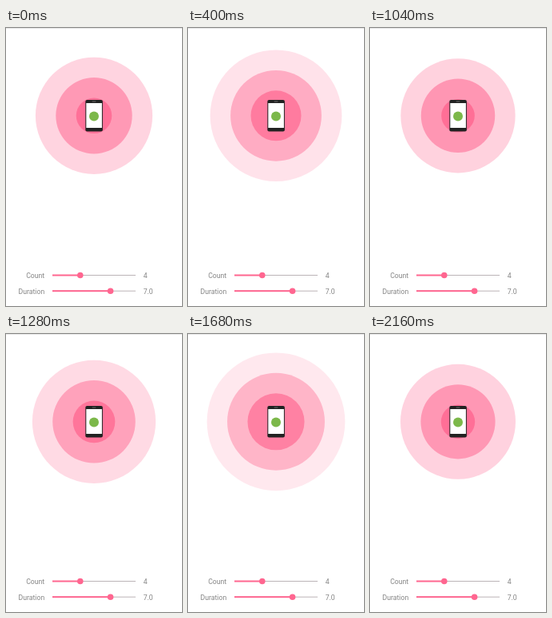
Write an HTML page that moves like this. It is 220 by 348 pixels and loops after 2240 ms.

```html
<!DOCTYPE html>
<html lang="en">
<head>
<meta charset="utf-8">
<title>Pulse rings</title>
<style>
  html, body { margin: 0; width: 100%; height: 100%; overflow: hidden; background: #fff; }
  svg { display: block; }
  text { font: 8.7px Roboto, sans-serif; fill: #858585; }
  .label { text-anchor: end; }
  .pink { fill: #ff6690; }
</style>
</head>
<body>
<svg width="220" height="348" viewBox="0 0 220 348">
  <rect width="220" height="1" fill="#e9e9e9"/>
  <g id="rings" class="pink"></g>

  <rect x="99.3" y="90" width="21.6" height="39.5" rx="2" fill="#222"/>
  <rect x="100.3" y="94" width="19.6" height="31" fill="#fff"/>
  <rect x="107.5" y="91.6" width="5" height="0.9" rx="0.4" fill="#666"/>
  <circle cx="110" cy="110.5" r="6" fill="#7cb84a"/>

  <g id="sliders"></g>
</svg>
<script>
const FRAME = 80, LOOP = 2240;
const GAP = 25.4, REACH = 4 * GAP;   // four rings share the full radius
const START = 73.1, STEP = 1.84;     // radius at time 0, growth per frame
const FADED = 93.4;                  // rings past this radius are not seen

const ringBox = document.getElementById('rings');
const rings = Array.from({ length: 4 }, () => {
  const ring = document.createElementNS('http://www.w3.org/2000/svg', 'circle');
  ring.setAttribute('cx', 110);
  ring.setAttribute('cy', 109.8);
  return ringBox.appendChild(ring);
});

const slider = (label, value, y, thumb) => `
  <text class="label" x="48.2" y="${y + 3.4}">${label}</text>
  <rect x="58" y="${y - 0.5}" width="104" height="1" fill="#bcb4b7"/>
  <rect class="pink" x="58" y="${y - 1}" width="${thumb - 58}" height="2"/>
  <circle class="pink" cx="${thumb}" cy="${y}" r="3.8"/>
  <text x="171.7" y="${y + 3.4}">${value}</text>`;
document.getElementById('sliders').innerHTML =
  slider('Count', '4', 309.5, 92.8) + slider('Duration', '7.0', 329.2, 130.6);

function draw(time) {
  const frame = Math.floor((time % LOOP) / FRAME);
  const inner = (START + frame * STEP) % GAP;
  rings.forEach((ring, i) => {
    const r = inner + (3 - i) * GAP;   // largest first
    ring.setAttribute('r', r);
    ring.setAttribute('opacity', r > FADED ? 0 : 1 - r / REACH);
  });
}

const begin = performance.now();
function tick() {
  draw(performance.now() - begin);
  requestAnimationFrame(tick);
}
tick();
</script>
</body>
</html>
```
